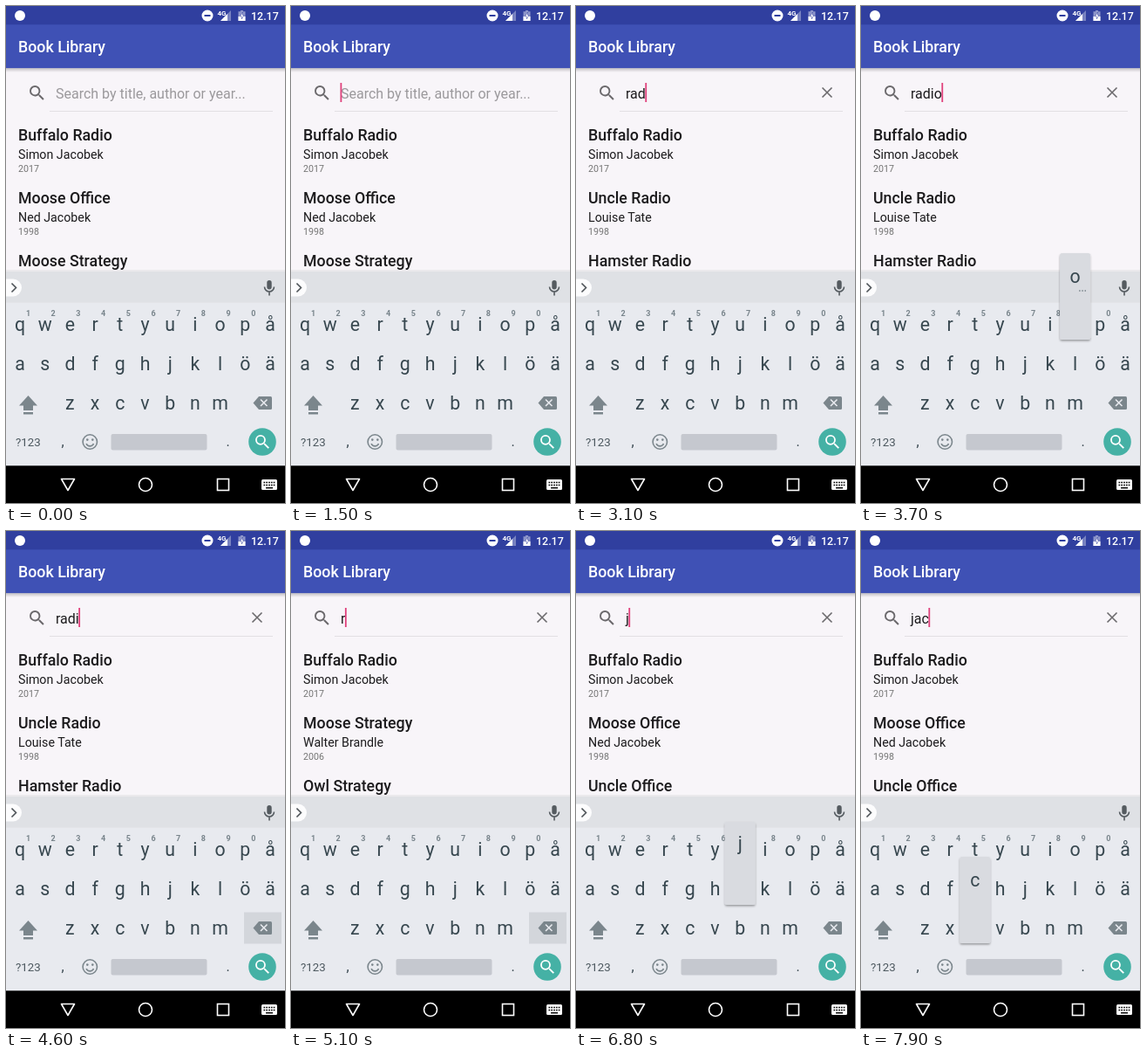
An HTML page for the animation above (8 s loop, 320x569 px).

```html
<!DOCTYPE html>
<html lang="en">
<head>
<meta charset="utf-8">
<title>Book Library</title>
<style>
  html, body { margin: 0; width: 100%; height: 100%; overflow: hidden; background: #000; }
  svg { display: block; width: 100vw; height: 100vh; font-family: Roboto, sans-serif; }
  .heading { font-size: 17.78px; font-weight: 500; }
  .author { font-size: 14.22px; }
  .year { font-size: 10.67px; fill: #757575; }
  .field { font-size: 16px; }
  .key { font-size: 21.3px; fill: #37474f; text-anchor: middle; }
  .digit { font-size: 9px; font-weight: 700; fill: #78848b; text-anchor: middle; }
  .line { fill: none; stroke-width: 1.6; }
</style>
</head>
<body>
<svg viewBox="0 0 320 569">
  <defs>
    <linearGradient id="fade" x2="0" y2="1">
      <stop offset="0" stop-opacity=".22"/><stop offset="1" stop-opacity="0"/>
    </linearGradient>
    <filter id="shadow" x="-30%" y="-10%" width="160%" height="125%">
      <feDropShadow dx="0" dy="1.5" stdDeviation="1.3" flood-opacity=".35"/>
    </filter>
    <path id="glass" d="M15.5 14h-.79l-.28-.27A6.47 6.47 0 0 0 16 9.5 6.5 6.5 0 1 0 9.5 16c1.61 0 3.09-.59 4.23-1.57l.27.28v.79l5 4.99L20.49 19l-4.99-5zm-6 0a4.5 4.5 0 1 1 0-9 4.5 4.5 0 0 1 0 9z"/>
  </defs>

  <rect width="320" height="569" fill="#f8f5f9"/>
  <g id="list" fill="#1c1b1d"></g>

  <!-- Search field -->
  <use href="#glass" transform="translate(24.2 88.2) scale(.95)" fill="#6b696c"/>
  <path d="M50 120.5H306" stroke="#e2dfe3"/>
  <text id="hint" class="field" x="57" y="105.5" fill="#9b999c">Search by title, author or year...</text>
  <text id="query" class="field" x="57" y="105.5" fill="#1c1b1d"></text>
  <rect id="caret" y="88" width="1.8" height="22" fill="#e0407b"/>
  <path id="clear" class="line" d="M282.5 93.5l11 11m0-11l-11 11" stroke="#6b696c"/>

  <!-- Status and app bars -->
  <rect y="71" width="320" height="5" fill="url(#fade)"/>
  <rect width="320" height="71.1" fill="#3f51b5"/>
  <rect width="320" height="21.3" fill="#303f9f"/>
  <g fill="#fff">
    <text class="heading" x="14" y="53">Book Library</text>
    <circle cx="16" cy="11" r="6"/>
    <circle cx="231" cy="11" r="6.5"/>
    <path d="M227.5 11h7" stroke="#303f9f" stroke-width="2"/>
    <path d="M258 5v12H246z" opacity=".35"/>
    <path d="M254 9v8h-8z"/>
    <text x="242.5" y="10.5" font-size="8" font-weight="700">4G</text>
    <path d="M269 5h3v1.3h2.5V17h-8V6.3h2.5z" opacity=".45"/>
    <path d="M266.5 12h8v5h-8z"/>
    <path d="M271.5 7l-3 5h1.8v3l2.7-4.5h-1.5z" stroke="#303f9f" stroke-width=".5"/>
    <text x="281" y="15.5" font-size="12.44" font-weight="500">12.17</text>
  </g>

  <!-- Keyboard -->
  <rect y="302" width="320" height="2" fill="#000" opacity=".05"/>
  <rect y="304" width="320" height="223" fill="#e8eaef"/>
  <rect y="304" width="320" height="35.6" fill="#dfe1e5"/>
  <path d="M0 312.5h8a10 10 0 0 1 0 20H0z" fill="#fcfcfd"/>
  <path class="line" d="M6.5 317.5l5 5-5 5" stroke="#4c5257"/>
  <g stroke="#555b60">
    <rect x="299.3" y="314" width="5.4" height="10.5" rx="2.7" fill="#555b60" stroke="none"/>
    <path class="line" d="M296.5 321.5a5.5 5.5 0 0 0 11 0M302 327.5v4"/>
  </g>
  <rect id="deletePress" x="273" y="436.5" width="43" height="36" fill="#d3d6db"/>
  <g id="keys"></g>
  <g fill="#7b868c">
    <path d="M25.5 446L36 457.5H31V463H20V457.5H15zM20 465h11v2.5H20z"/>
    <path d="M290 447h13.5q1.5 0 1.5 1.5v12q0 1.5-1.5 1.5H290l-6.5-7.5z"/>
    <path class="line" d="M292 450.5l7.500 7.500m0-7.500l-7.500 7.500" stroke="#e8eaef"/>
    <g transform="translate(96.3 499)">
      <circle class="line" r="8.2" stroke="#7b868c"/>
      <circle cx="-3" cy="-2.4" r="1.3"/><circle cx="3" cy="-2.4" r="1.3"/>
      <path class="line" d="M-4.2 2a4.5 4.5 0 0 0 8.4 0" stroke="#7b868c"/>
    </g>
  </g>
  <text x="11" y="504" font-size="13.3" fill="#4c585f">?123</text>
  <text class="key" x="65" y="504" style="font-size: 16px">,</text>
  <text class="key" x="254.5" y="504" style="font-size: 16px">.</text>
  <rect x="120.5" y="490" width="110" height="18.5" rx="2" fill="#c5c8cf"/>
  <circle cx="294" cy="499" r="15.8" fill="#45b1a5"/>
  <use href="#glass" transform="translate(283.3 488.2) scale(.91)" fill="#fff"/>

  <g id="popup">
    <rect width="35" rx="2.5" fill="#d9dbe0" filter="url(#shadow)"/>
    <text class="key" x="17.5"></text>
    <path id="more" d="M22 43h8" stroke="#78848b" stroke-width="1.5" stroke-dasharray="1.5 1.7"/>
  </g>

  <!-- Navigation bar -->
  <rect y="526.3" width="320" height="43" fill="#000"/>
  <g class="line" stroke="#fff">
    <path d="M63.5 541.5h15L71 554.5z" stroke-linejoin="round"/>
    <circle cx="160" cy="548" r="7.5"/>
    <rect x="242.5" y="541.5" width="13" height="13"/>
  </g>
  <rect x="293" y="542" width="18" height="12" rx="1.5" fill="#fff"/>
  <path d="M295.5 545.5h13M295.5 548.5h13" stroke="#000" stroke-width="1.6" stroke-dasharray="1.7 1.1"/>
  <path d="M298 551.7h8" stroke="#000" stroke-width="1.5"/>
</svg>
<script>
const LOOP = 8000, BLINK = 500, ROW_PITCH = 72, KEY_PITCH = 28.7;

const books = [
  ["Buffalo Radio", "Simon Jacobek", 2017],
  ["Moose Office", "Ned Jacobek", 1998],
  ["Moose Strategy", "Walter Brandle", 2006],
  ["Owl Strategy", "Peter Lund", 2011],
  ["Uncle Office", "Hilda Jacobek", 2003],
  ["Uncle Radio", "Louise Tate", 1998],
  ["Hamster Radio", "Owen Dale", 2009],
];

const keyRows = [
  { letters: "qwertyuiopå", x: 16, baseline: 372, popupTop: 283, popupHeight: 99 },
  { letters: "asdfghjklöä", x: 16, baseline: 417, popupTop: 333, popupHeight: 95 },
  { letters: "zxcvbnm", x: 16 + 2 * KEY_PITCH, baseline: 462, popupTop: 373, popupHeight: 99 },
];

// Query text from each time on; the caret restarts its blink at every edit.
const edits = [
  [-500, ""], [2000, "r"], [2500, "ra"], [3000, "rad"], [3400, "radi"], [3700, "radio"],
  [4300, "radi"], [4700, "rad"], [4800, "ra"], [5000, "r"], [5200, ""],
  [5900, "k"], [6400, ""], [6800, "j"], [7500, "ja"], [7900, "jac"],
];

// Keys held down: start, end, key.
const presses = [
  [1900, 2100, "r"], [2400, 2600, "a"], [2900, 3100, "d"], [3200, 3500, "i"], [3600, 3800, "o"],
  [4300, 5200, "delete"], [5800, 6000, "k"], [6800, 6900, "j"], [7400, 7600, "a"], [7900, 8000, "c"],
];

const byId = id => document.getElementById(id);
const show = (id, visible) => byId(id).style.display = visible ? "" : "none";
const label = (className, x, y, text) => `<text class="${className}" x="${x}" y="${y}">${text}</text>`;

const keys = {};
byId("keys").innerHTML = keyRows.map((row, r) => [...row.letters].map((letter, i) => {
  const x = row.x + i * KEY_PITCH;
  keys[letter] = { x, row };
  const digit = r === 0 && i < 10 ? label("digit", x + 9.5, 355, (i + 1) % 10) : "";
  return label("key", x, row.baseline, letter) + digit;
}).join("")).join("");

function drawList(query) {
  const matches = books.filter(([title, author]) => `${title}\n${author}`.toLowerCase().includes(query));
  byId("list").innerHTML = matches.slice(0, 3).map(([title, author, year], i) => {
    const y = i * ROW_PITCH;
    return label("heading", 14, 154 + y, title) + label("author", 14, 174.5 + y, author) + label("year", 14, 190 + y, year);
  }).join("");
}

function drawPopup(letter) {
  const key = keys[letter];
  show("popup", key);
  if (!key) return;
  const { popupTop, popupHeight } = key.row;
  const popup = byId("popup");
  popup.setAttribute("transform", `translate(${key.x - 17.5} ${popupTop})`);
  popup.querySelector("rect").setAttribute("height", popupHeight);
  const text = popup.querySelector("text");
  text.textContent = letter;
  text.setAttribute("y", popupHeight / 2 - 15.5);
  show("more", "rioa".includes(letter));
}

let shownQuery;
function draw(now) {
  const t = now % LOOP;
  const [editTime, query] = edits.findLast(([time]) => time <= t);
  const held = presses.find(([start, end]) => t >= start && t < end)?.[2];

  if (query !== shownQuery) {
    shownQuery = query;
    drawList(query);
    byId("query").textContent = query;
    byId("caret").setAttribute("x", 56.5 + (query && byId("query").getComputedTextLength()));
    show("hint", !query);
    show("clear", query);
  }
  show("caret", Math.floor((t - editTime) / BLINK) % 2 === 0);
  show("deletePress", held === "delete");
  drawPopup(held);
}

const start = performance.now();
function tick() {
  draw(performance.now() - start);
  requestAnimationFrame(tick);
}
tick();
</script>
</body>
</html>
```
